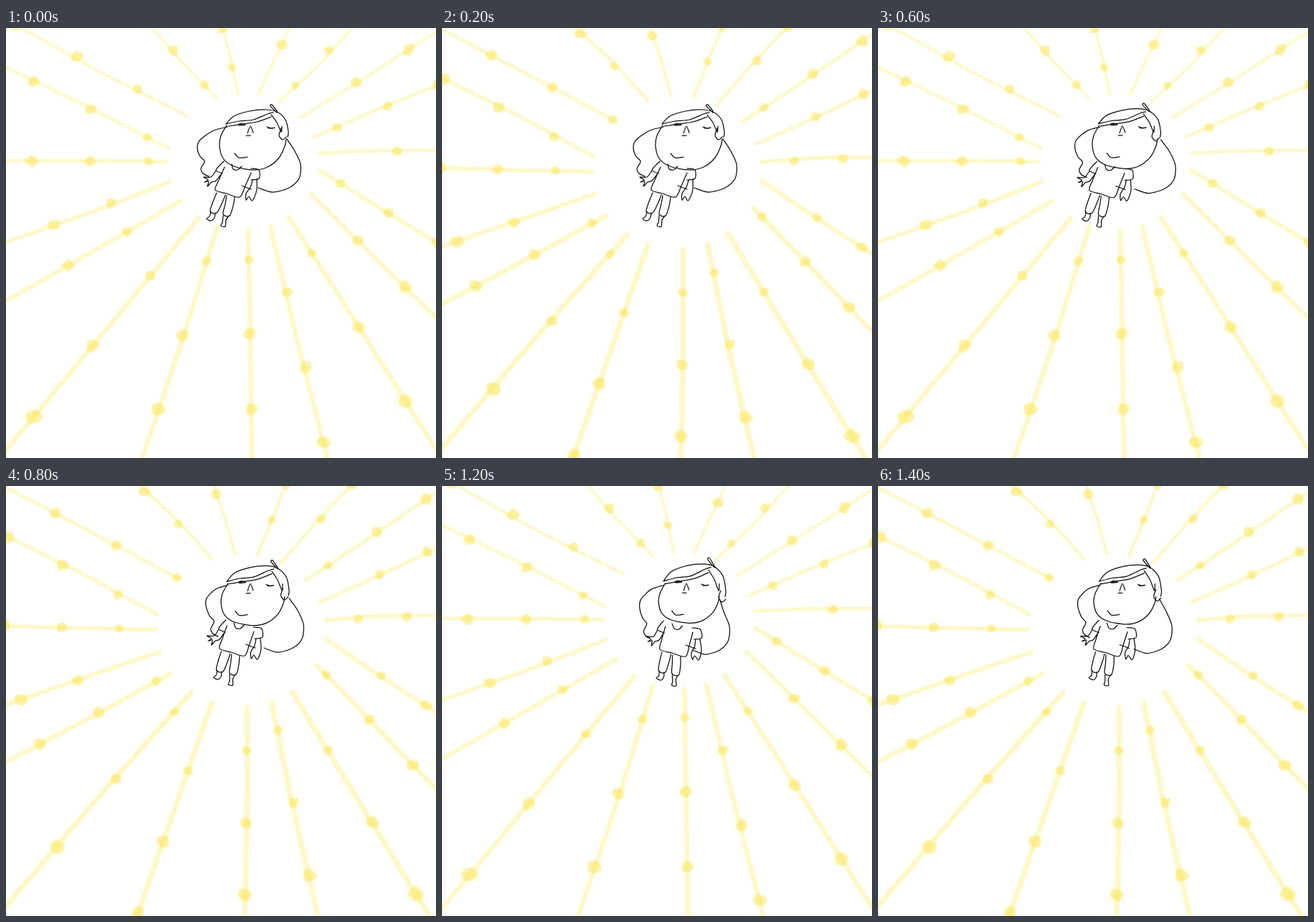
Write an HTML page that moves like this. It is 600 by 600 pixels and loops after 1600 ms.

```html
<!DOCTYPE html>
<html lang="en">
<head>
<meta charset="utf-8">
<title>Floating girl</title>
<style>
html, body { margin: 0; width: 100%; height: 100%; overflow: hidden; background: #fff; }
svg { display: block; width: 100vw; height: 100vh; }
path { stroke-linecap: round; stroke-linejoin: round; }
.ray { fill: none; stroke: #fae650; stroke-opacity: .33; }
.bead { fill: #f9e23c; fill-opacity: .48; }
.ink { fill: none; stroke: #0c0c0c; stroke-width: 1.25; }
</style>
</head>
<body>
<svg id="stage" viewBox="0 0 600 600">
  <defs>
    <filter id="soft" x="0" y="0" width="600" height="600" filterUnits="userSpaceOnUse">
      <feGaussianBlur stdDeviation=".9"/>
    </filter>
  </defs>
</svg>
<script>
const stage = document.getElementById('stage');
const STEP = 200, STEPS = 8;

// The three skies share their rays; the gap in the middle and the outer ends drift.
const skies = [
  { cx: 331, cy: 188, r: 106, drift: -10, weight: 3.4 },
  { cx: 328, cy: 202, r: 119, drift: 0, weight: 4 },
  { cx: 335, cy: 207, r: 125, drift: 10, weight: 4.4 }
];

// Per ray: inner angle, outer end, and the distance to the first bead in each sky.
const rays = `
  223 0 2 79 3 77
  192 0 70 34 62 5
  181 0 195 26 51 110
  164 0 305 88 120 85
  146 0 385 86 22 79
  126 0 587 105 35 93
  110 183 600 50 100 37
  86 333 600 40 61 4
  69 436 600 95 40 70
  53 591 600 59 95 35
  27 600 423 92 18 75
  6 600 315 36 93 154
  -8 600 181 109 46 99
  -22 600 87 35 92 39
  -41 600 9 92 38 100
  -62 481 0 33 83 33
  -79 390 0 79 53 24
  -94 290 0 39 88 76
  -110 186 0 26 68 3`.trim().split('\n').map(row => row.trim().split(' ').map(Number));

// The girl leaning left; strokes are split by "|". Each part has a rule for how it sways.
const girl = [
  { // long hair
    strokes: '309,138 290,143 272,155 267,165 270,178 277,186 272,196 275,203 283,207|392,155 402,170 411,190 409,210 395,223 372,229 352,223',
    sway(x, y, lean) {
      const loose = Math.min(1, (y - 135) / 35);
      return [loose * (lean * (340 - x) * .14 + 9 * Math.sin(Math.PI * lean)), loose * lean * 6];
    }
  },
  { // crown and fringe
    strokes: '307,134 318,123 340,116 362,114 378,117 390,128 394,145 393,152|307,134 325,130 345,128 365,120 373,118|310,137 330,134 350,131 370,124|370,121 378,132 384,145 385,137|378,118 369,109 371,107 378,116',
    sway: (x, y, lean) => [lean * 2, -lean * (140 - y) * .2]
  },
  { // head
    strokes: '308,136 300,150 298,165 303,182 318,193 345,198 365,194 381,181 389,165 391,155',
    sway: (x, y, lean) => [lean * (345 - x) * .09, -lean * Math.max(0, y - 150) * .14]
  },
  { // ear
    strokes: '384,140 381,150 386,156 391,152',
    sway: (x, y, lean) => [lean * 5, lean * 6]
  },
  { // eyes, nose, mouth
    strokes: '323,135 328,133 334,135 325,136|364,138 370,140 375,139 366,140|337,147 341,137 345,146|335,150 341,150|319,175 325,181 337,180',
    sway: (x, y, lean) => [lean * (340 - x) * .08, -lean]
  },
  { // shirt, arms, legs, feet
    strokes: '315,190 317,197 323,198 329,193|305,194 297,212 292,226 308,231 326,236 334,220 342,202|304,186 293,198 302,203|342,196 353,198 353,210 342,212|329,220 342,225'
      + '|293,199 286,208 276,208 282,212 277,215 283,214 281,221 287,215 293,213 301,203|344,212 341,222 335,231 335,240 339,235 343,241 347,235 350,225 350,211'
      + '|294,230 289,242 285,256 294,258 302,243 306,233|308,234 306,245 303,260 312,262 317,248 319,236|286,256 284,263 280,266 286,269 291,264 292,258|303,262 302,271 300,276 306,277 307,268 311,262',
    sway: (x, y, lean) => [lean * (6 + (y - 190) * .17), lean * 2]
  }
];
for (const part of girl) {
  part.points = part.strokes.split('|').map(s => s.split(' ').map(p => p.split(',').map(Number)));
}

let seed = 7;
const random = () => (seed = seed * 16807 % 2147483647) / 2147483647;
const mix = (a, b, t) => a + (b - a) * t;

function add(parent, tag, attrs) {
  const el = document.createElementNS(stage.namespaceURI, tag);
  for (const key in attrs) el.setAttribute(key, attrs[key]);
  return parent.appendChild(el);
}

// Smooth curve through the points, gently rounded at each one.
function curve(pts, closed) {
  const n = pts.length;
  const at = i => pts[closed ? (i + n) % n : Math.max(0, Math.min(n - 1, i))];
  let d = 'M' + pts[0];
  for (let i = 0; i < (closed ? n : n - 1); i++) {
    const [a, b, c, e] = [at(i - 1), at(i), at(i + 1), at(i + 2)];
    const c1 = [0, 1].map(k => b[k] + (c[k] - a[k]) / 7);
    const c2 = [0, 1].map(k => c[k] - (e[k] - b[k]) / 7);
    d += `C${c1} ${c2} ${c}`;
  }
  return d;
}

function blob(x, y, r) {
  const pts = [];
  for (let i = 0; i < 8; i++) {
    const a = i * Math.PI / 4, q = r * mix(.82, 1.15, random());
    pts.push([x + Math.cos(a) * q * 1.05, y + Math.sin(a) * q]);
  }
  return curve(pts, true);
}

function drawSky({ cx, cy, r, drift, weight }, index) {
  const g = add(stage, 'g', { filter: 'url(#soft)' });
  for (const [angle, endX, endY, ...firsts] of rays) {
    const a = angle * Math.PI / 180;
    const x0 = cx + r * Math.cos(a), y0 = cy + r * .9 * Math.sin(a);
    const x1 = endX - drift, y1 = endY + drift;
    const length = Math.hypot(x1 - x0, y1 - y0);
    const point = t => [mix(x0, x1, t), mix(y0, y1, t)];
    const bow = point(.5).map(v => v + mix(-3, 3, random()));
    const width = weight + (y0 + y1) / 260;
    add(g, 'path', { class: 'ray', d: curve([point(0), bow, point(1.1)]), 'stroke-width': width });

    const gap = 30 + length * .24;
    for (let d = firsts[index]; d < length + 5; d += gap) {
      const size = 5.3 + d / 85 + random();
      add(g, 'path', { class: 'bead', d: blob(...point(d / length), size) });
    }
  }
  return g;
}

function poseGirl(lean) {
  const place = ([x, y], sway) => {
    const [dx, dy] = sway(x, y, lean);
    return [x + dx, y + dy];
  };
  return girl.flatMap(({ points, sway }) =>
    points.map(stroke => curve(stroke.map(p => place(p, sway))))).join('');
}

const layers = skies.map(drawSky);
const ink = add(stage, 'path', { class: 'ink' });

function render(time) {
  const step = Math.floor(time / STEP) % STEPS;
  layers.forEach((el, i) => el.setAttribute('visibility', i === step % 3 ? 'visible' : 'hidden'));
  // Hang still, then swing to the right and back.
  ink.setAttribute('d', poseGirl(Math.max(0, 1 - Math.abs(step - 6) / 4)));
}

function tick() {
  render(performance.now());
  requestAnimationFrame(tick);
}
tick();
</script>
</body>
</html>
```
